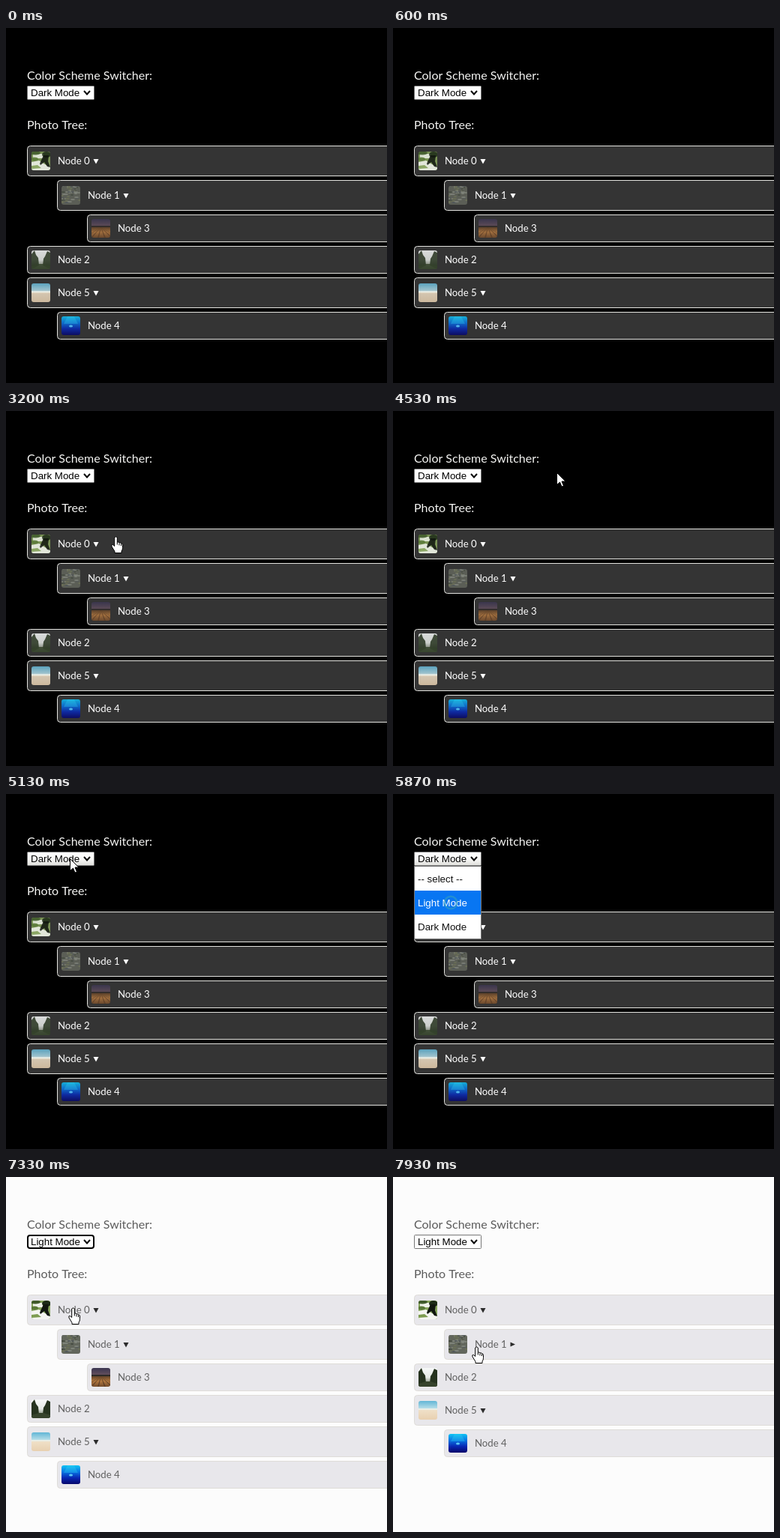
Write an HTML page with a canvas that moves like this. It is 508 px wide and 474 px high and loops after 8 s.

```html
<!DOCTYPE html>
<html lang="en">
<head>
<meta charset="utf-8">
<title>Photo Tree</title>
<style>
  html, body { margin: 0; width: 100%; height: 100%; overflow: hidden; background: #000; }
  canvas { display: block; }
</style>
</head>
<body>
<canvas id="stage" width="508" height="474"></canvas>
<script>
const ctx = document.getElementById('stage').getContext('2d');
const W = 508, H = 474, LOOP = 8000, FRAME = 1000 / 15;
const UI_FONT = '13.333px "Liberation Sans", Arial, sans-serif';
const LABEL_FONT = '16px Lato, sans-serif';
const NODE_FONT = '13.2px Lato, sans-serif';

const THEMES = {
  dark: { page: '#000', label: '#f4f4f2', node: '#343434', border: '#e4e4e0', text: '#fff', arrow: '#fff', photo: 0.85 },
  light: { page: '#fcfcfc', label: '#5c5c5c', node: '#e8e7eb', border: '#dedcd8', text: '#606060', arrow: '#2c2c2c', photo: 1 }
};

const TIMES = { open: 5320, pick: 5900, blur: 7520, collapse: 7650 };
const CLICKS = [[5190, 5320], [5720, 5900], [7520, 7720]];

// Pointer stops: time, x, y
const PATH = [
  [2600, 82, 449], [3200, 146, 167], [3400, 184, 120], [3800, 218, 82],
  [4530, 218, 82], [4930, 87, 85], [5070, 87, 85], [5130, 85, 86],
  [5390, 85, 86], [5700, 77, 145], [7200, 77, 145], [7530, 111, 226]
];

const ARROW = new Path2D('M0 0V16L4 12.5L6.5 18.5L9 17.5L6.5 11.5H11.5Z');
const HAND = new Path2D('M-1.8 1.5Q0-1 1.8 1.5V8Q3.5 6.5 4.5 8.6Q6.5 7.5 7 9.5Q9 9 9 11.5V15Q9 18 7.5 19.5V22H-1.5V20L-5.5 13.5Q-6.5 10.5-4 11L-1.8 13Z');
const KNUCKLES = new Path2D('M1.8 8V11M4.5 9V12M7 10V12.5');

function rect(color, x, y, w, h) {
  ctx.fillStyle = color;
  ctx.fillRect(x, y, w, h);
}

function ellipse(color, x, y, rx, ry = rx) {
  ctx.fillStyle = color;
  ctx.beginPath();
  ctx.ellipse(x, y, rx, ry, 0, 0, Math.PI * 2);
  ctx.fill();
}

function poly(color, ...points) {
  ctx.fillStyle = color;
  ctx.beginPath();
  points.forEach(([x, y]) => ctx.lineTo(x, y));
  ctx.fill();
}

function roundBox(x, y, w, h, r) {
  ctx.beginPath();
  ctx.roundRect(x, y, w, h, r);
}

function text(str, x, y, color, font) {
  ctx.font = font;
  ctx.fillStyle = color;
  ctx.fillText(str, x, y);
}

function fade(y0, y1, ...colors) {
  const g = ctx.createLinearGradient(0, y0, 0, y1);
  colors.forEach((c, i) => g.addColorStop(i / (colors.length - 1), c));
  return g;
}

// Each thumbnail is painted in a 25 x 25 box
const PHOTOS = {
  park() {
    rect('#86a45c', 0, 0, 25, 25);
    rect('#eef1e8', 2, 3, 14, 6);
    ellipse('#3f5a2a', 5, 2, 7, 2.5);
    ellipse('#5a7a38', 4, 10, 5, 2.5);
    poly('#f4f5f0', [0, 14], [10, 12], [18, 17], [25, 20], [25, 25], [0, 25]);
    poly('#7d9c50', [0, 19], [8, 18], [13, 22], [0, 23]);
    ellipse('#1c2a16', 20, 4, 6, 4);
    poly('#10160e', [16, 5], [23, 5], [22, 13], [25, 21], [21, 20], [17, 14], [12, 18], [11, 16]);
  },
  rocks() {
    rect('#62665c', 0, 0, 25, 25);
    let seed = 7;
    const rnd = n => (seed = seed * 16807 % 2147483647) % n;
    for (let i = 0; i < 55; i++) {
      ellipse(['#454b40', '#80857c', '#6b7058', '#52585a'][rnd(4)], rnd(25), rnd(25), 1 + rnd(3), 1);
    }
  },
  field() {
    rect(fade(0, 11, '#3a3550', '#6b5460'), 0, 0, 25, 11);
    rect(fade(10, 25, '#553a24', '#b27840', '#744c2c'), 0, 10, 25, 15);
    rect('#2d2a28', 0, 9, 25, 2);
    for (let x = -10; x <= 35; x += 9) {
      poly('#5f4028', [12.5, 11], [x, 25], [x + 2, 25]);
    }
  },
  forest() {
    rect(fade(0, 25, '#f6f8f8', '#e6eae6', '#4a5740'), 0, 0, 25, 25);
    poly('#26331f', [0, 5], [4, 0], [6, 6], [9, 10], [10, 20], [0, 25]);
    poly('#26331f', [25, 3], [21, 1], [18, 8], [16, 11], [15, 20], [25, 25]);
    poly('#36432c', [0, 21], [10, 18], [16, 18], [25, 21], [25, 25], [0, 25]);
  },
  beach() {
    rect(fade(0, 11, '#62b6d6', '#bfe2ea'), 0, 0, 25, 12);
    rect('#e9eee6', 0, 10, 25, 3);
    rect(fade(12, 25, '#efe0c8', '#e8d0b0'), 0, 12, 25, 13);
  },
  sea() {
    rect(fade(0, 25, '#10c4f4', '#0878e4', '#0828b4', '#06066a'), 0, 0, 25, 25);
    poly('#35d3f055', [8, 0], [17, 0], [22, 10], [3, 10]);
    ellipse('#5cc8f6', 12.5, 13, 2.5, 1.5);
  }
};

const NODES = [
  { name: 'Node 0', depth: 0, photo: 'park', parent: true },
  { name: 'Node 1', depth: 1, photo: 'rocks', parent: true, folds: true },
  { name: 'Node 3', depth: 2, photo: 'field', foldable: true },
  { name: 'Node 2', depth: 0, photo: 'forest' },
  { name: 'Node 5', depth: 0, photo: 'beach', parent: true },
  { name: 'Node 4', depth: 1, photo: 'sea' }
];

function layout(folded) {
  let y = 157;
  return NODES.filter(n => !(folded && n.foldable)).map(n => {
    const box = { ...n, x: 28 + n.depth * 40, y, h: n.parent ? 41 : 37, closed: folded && n.folds };
    y += box.h + 5;
    return box;
  });
}

function drawNode(n, theme) {
  roundBox(n.x + 0.5, n.y + 0.5, W, n.h - 1, 4);
  ctx.fillStyle = theme.node;
  ctx.fill();
  ctx.strokeStyle = theme.border;
  ctx.lineWidth = 1;
  ctx.stroke();

  const mid = n.y + Math.floor(n.h / 2);
  ctx.save();
  ctx.translate(n.x + 6, mid - 12);
  roundBox(0, 0, 25, 25, 3);
  ctx.clip();
  ctx.globalAlpha = theme.photo;
  PHOTOS[n.photo]();
  ctx.restore();

  text(n.name, n.x + 41, mid + 5, theme.text, NODE_FONT);
  if (!n.parent) return;
  const x = n.x + 88;
  if (n.closed) poly(theme.arrow, [x + 0.5, mid - 2.5], [x + 7, mid + 0.5], [x + 0.5, mid + 3.5]);
  else poly(theme.arrow, [x + 0.5, mid - 2], [x + 7.5, mid - 2], [x + 4, mid + 4.5]);
}

function drawSelect(label, hover, focused) {
  const line = focused ? 2 : 1;
  roundBox(28 + line / 2, 77 + line / 2, 90 - line, 19 - line, focused ? 3 : 1);
  ctx.fillStyle = hover ? fade(78, 96, '#fff', '#f8f8f6', '#dcdcd8') : '#fff';
  ctx.fill();
  ctx.strokeStyle = focused ? '#000' : '#767676';
  ctx.lineWidth = line;
  ctx.stroke();
  text(label, 33, 91, '#000', UI_FONT);
  ctx.strokeStyle = '#000';
  ctx.lineWidth = 2;
  ctx.beginPath();
  ctx.moveTo(104, 84);
  ctx.lineTo(108, 88.5);
  ctx.lineTo(112, 84);
  ctx.stroke();
}

function drawMenu(active) {
  rect('#767676', 28, 96, 90, 98);
  rect('#fff', 29, 97, 88, 96);
  ['-- select --', 'Light Mode', 'Dark Mode'].forEach((label, i) => {
    const y = 97 + i * 32;
    if (i === active) rect('#0876f2', 29, y, 88, 32);
    text(label, 33, y + 21, i === active ? '#fff' : '#111', UI_FONT);
  });
}

function pointerAt(t) {
  if (t < PATH[0][0] - 5) return null;
  const next = PATH.findIndex(p => p[0] > t);
  if (next < 0) return PATH.at(-1).slice(1);
  if (next === 0) return PATH[0].slice(1);
  const [t0, x0, y0] = PATH[next - 1], [t1, x1, y1] = PATH[next];
  const p = (t - t0) / (t1 - t0), e = p * p * (3 - 2 * p);
  return [Math.round(x0 + (x1 - x0) * e), Math.round(y0 + (y1 - y0) * e)];
}

function drawPointer(t, [x, y], hand) {
  const click = CLICKS.find(([from, to]) => t >= from && t < to);
  if (click) {
    const p = (t - click[0]) / (click[1] - click[0]);
    ctx.globalAlpha = 0.8 - 0.35 * p;
    ctx.strokeStyle = '#3aa5b5';
    ctx.lineWidth = 2.5;
    ctx.beginPath();
    ctx.arc(x, y, 5 + 4 * p, 0, Math.PI * 2);
    ctx.stroke();
    ctx.globalAlpha = 1;
    return;
  }
  const shape = hand ? HAND : ARROW;
  ctx.save();
  ctx.translate(x + 0.5, y + 0.5);
  ctx.fillStyle = '#fff';
  ctx.strokeStyle = '#000';
  ctx.lineWidth = 1;
  ctx.fill(shape);
  ctx.stroke(shape);
  if (hand) ctx.stroke(KNUCKLES);
  ctx.restore();
}

function draw(t) {
  const light = t >= TIMES.pick;
  const theme = light ? THEMES.light : THEMES.dark;
  const open = t >= TIMES.open && !light;
  const pointer = pointerAt(t);
  const [px, py] = pointer || [-1, -1];
  const overSelect = px >= 28 && px < 118 && py >= 77 && py < 96;
  const nodes = layout(t >= TIMES.collapse);

  rect(theme.page, 0, 0, W, H);
  text('Color Scheme Switcher:', 28, 69, theme.label, LABEL_FONT);
  text('Photo Tree:', 28, 135, theme.label, LABEL_FONT);
  nodes.forEach(n => drawNode(n, theme));
  drawSelect(light ? 'Light Mode' : 'Dark Mode', overSelect || open, light && t < TIMES.blur);
  if (open) drawMenu(py < 97 ? 2 : Math.floor((py - 97) / 32));
  if (pointer) {
    const hand = !open && nodes.some(n => px >= n.x && py >= n.y && py < n.y + n.h);
    drawPointer(t, pointer, hand);
  }
}

const start = performance.now();
function tick() {
  const t = (performance.now() - start) % LOOP;
  draw(Math.floor((t + 4) / FRAME) * FRAME);
  requestAnimationFrame(tick);
}
tick();
</script>
</body>
</html>
```
